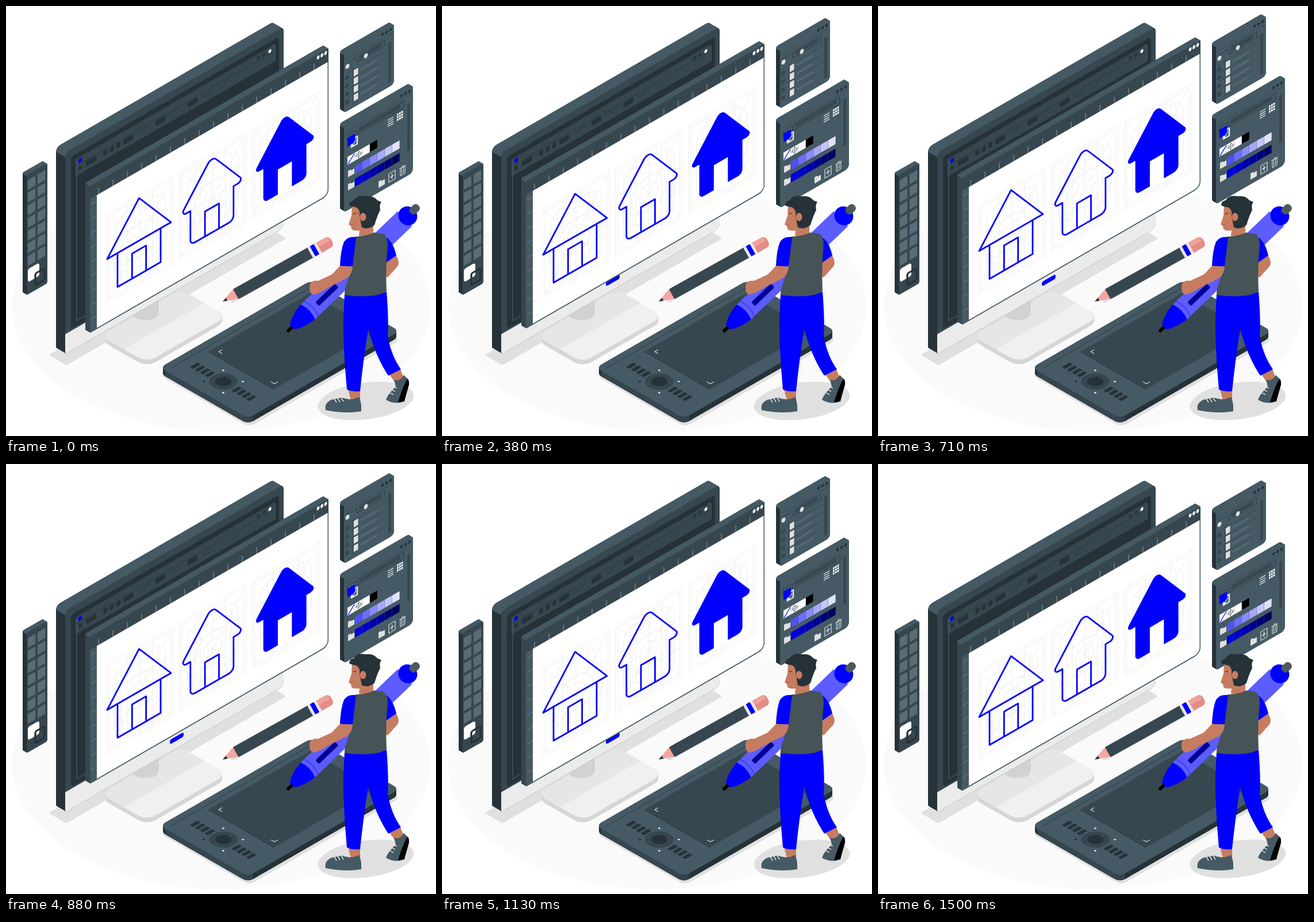
Write an HTML page with a canvas that moves like this. It is 748 px wide and 748 px high and loops after 1540 ms.

```html
<!DOCTYPE html>
<html lang="en">
<head>
<meta charset="utf-8">
<title>Icon design studio</title>
<style>
html, body { margin: 0; width: 100%; height: 100%; overflow: hidden; background: #fff; }
canvas { display: block; width: 100vw; height: 100vh; }
</style>
</head>
<body>
<canvas id="stage" width="748" height="748"></canvas>
<script>
const ctx = document.getElementById('stage').getContext('2d');
const SLOPE = 0.577;
const INK = '#263238', DARK = '#37474f', SLATE = '#455a64';
const BLUE = '#0000ff', SHADE = '#e0e0e0', SKIN = '#c67c60';

function fill(d, color) {
  ctx.fillStyle = color;
  ctx.fill(new Path2D(d));
}
function line(d, color, width = 1) {
  ctx.strokeStyle = color;
  ctx.lineWidth = width;
  ctx.stroke(new Path2D(d));
}
function box(x, y, w, h, color, r = 0) {
  ctx.fillStyle = color;
  ctx.beginPath();
  ctx.roundRect(x, y, w, h, r);
  ctx.fill();
}
function frame(x, y, w, h, color, width = 1, r = 0) {
  ctx.strokeStyle = color;
  ctx.lineWidth = width;
  ctx.beginPath();
  ctx.roundRect(x, y, w, h, r);
  ctx.stroke();
}
function oval(x, y, rx, ry, color, turn = 0) {
  ctx.fillStyle = color;
  ctx.beginPath();
  ctx.ellipse(x, y, rx, ry, turn, 0, 7);
  ctx.fill();
}
function ring(x, y, r, color, width) {
  ctx.strokeStyle = color;
  ctx.lineWidth = width;
  ctx.beginPath();
  ctx.arc(x, y, r, 0, 7);
  ctx.stroke();
}
function repeat(count, draw) {
  for (let i = 0; i < count; i++) draw(i);
}
function within(matrix, draw) {
  ctx.save();
  ctx.transform(...matrix);
  draw();
  ctx.restore();
}
// Upright isometric face with its top left at (x, y).
const onFace = (x, y, draw) => within([1, -SLOPE, 0, 1, x, y], draw);
// Ground plane with its left corner at (x, y); u runs up right, v down right.
const onGround = (x, y, draw) => within([1, -SLOPE, 1, SLOPE, x, y], draw);
// Straight tool with its tip at (x, y), pointing along (dx, dy).
function along(x, y, dx, dy, draw) {
  const a = Math.atan2(dy, dx), c = Math.cos(a), s = Math.sin(a);
  within([c, s, -s, c, x, y], draw);
}

function slab(x, y, w, h, depth, radii, front, side, top) {
  const back = (d, draw) => onFace(x - d, y - d * SLOPE, draw);
  const lift = depth * SLOPE, capHeight = Math.max(lift, radii[1] * 2);
  for (let d = depth; d > 0; d -= 0.5) back(d, () => box(0, 0, w, h, side, radii));
  for (let d = depth; d > 0; d -= 0.5)
    back(d, () => box(0, 0, w, capHeight, top, [radii[0], radii[1], 0, 0]));
  fill(`M${x - depth} ${y - lift + radii[0]}V${y + 30}H${x}V${y + radii[0]}Z`, side);
  onFace(x, y, () => box(0, 0, w, h, front, radii));
}
function plate(x, y, u, v, thickness, r, top, side) {
  for (let d = thickness; d > 0; d -= 0.5) onGround(x, y + d, () => box(0, 0, u, v, side, r));
  onGround(x, y, () => box(0, 0, u, v, top, r));
}

function floor() {
  ctx.fillStyle = '#fff';
  ctx.fillRect(0, 0, 748, 748);
  oval(374, 522, 364, 218, '#fafafa');
  onGround(74, 607, () => box(0, 0, 383, 31, SHADE, 3));
  onGround(268, 643, () => box(0, 0, 263, 155, SHADE, 9));
  oval(626, 687, 84, 32, SHADE, -0.13);
  along(378, 518, 154, -86, () => box(14, -6, 188, 13, SHADE, 4));
}

function stand() {
  plate(165, 574, 140, 80, 8, 15, '#f0f0f0', '#d6d6d6');
  onGround(165, 574, () => box(0, 0, 140, 40, '#e6e6e6', [15, 15, 0, 0]));
  fill('M221 538Q224 547 246 546 267 545 266 530V505Z', '#d2d2d2');
}

function monitor() {
  slab(103, 255, 380, 351, 16, [8, 7, 10, 4], DARK, INK, SLATE);
  onFace(103, 255, () => {
    box(0, 316, 380, 35, '#ebebeb', [0, 0, 10, 4]);
    line('M4 350.5H370', '#d5d5d5', 0.8);
    box(10, 13, 362, 300, INK, 6);
    box(18, 22, 347, 30, DARK, [4, 5, 0, 0]);
    line('M45 304H20V27M360 22Q365 22 365 28V50', SLATE, 1.2);
    line('M18 34H365', INK, 0.7);
    box(23, 25, 6, 7, BLUE, 1);
    box(23, 38, 6, 7, INK, 1);
    repeat(3, i => oval(336 + i * 10, 29, 2.6, 3, i < 2 ? INK : '#fff'));
    repeat(3, i => box(66 + i * 11.5, 36, 7, 9, INK, 2));
    box(36, 36, 18, 9, INK, 2);
    repeat(3, i => {
      box(101 + i * 56, 36, 17, 9, INK, 2);
      line(`M${124 + i * 56} 38h22m-18 5h12`, INK, 0.8);
    });
  });
  onFace(285, 480, () => box(0, 0, 24, 8, BLUE, 3.5));
}

function palette() {
  slab(36, 294, 36, 209, 7, [2, 3, 3, 2], DARK, INK, SLATE);
  onFace(36, 294, () => {
    repeat(14, i => box(2 + i % 2 * 17, 10 + Math.floor(i / 2) * 22, 13, 17, '#5a6c75', 1));
    box(2, 165, 20, 23, '#fff', 4);
    frame(15, 180, 16, 20, INK, 3.4, 2);
  });
}

function guides() {
  const tone = '#e9e9e9', w = 0.65;
  frame(0, 0, 116, 154, tone, w);
  frame(4, 5, 108, 144, tone, w);
  frame(14, 18, 88, 118, tone, w, 18);
  frame(26, 10, 64, 134, tone, w, 14);
  for (const r of [16, 30, 48]) ring(58, 77, r, tone, w);
  repeat(3, i => line(`M${36 + i * 22} 5V149M4 ${50 + i * 27}H112`, tone, w));
  line('M4 5L112 149M112 5L4 149', tone, w);
}

const HOUSE = { mid: 56.5, peak: 4.5, eave: 78.5, base: 137.5, roof: 55.5, wall: 37.5, door: 12.2, lintel: 94 };

function traceHouse(r) {
  const { mid, peak, eave, base, roof, wall } = HOUSE;
  const half = [[wall, base, 1.5 * r], [wall, eave, 0], [roof, eave, r]];
  const mirrored = half.map(([x, y, round]) => [-x, y, round]).reverse();
  const corners = [...half, [0, peak, 1.6 * r], ...mirrored];
  ctx.beginPath();
  ctx.moveTo(mid, base);
  corners.forEach(([x, y, round], i) => {
    const next = corners[i + 1] || [0, base];
    ctx.arcTo(mid + x, y, mid + next[0], next[1], round);
  });
  ctx.closePath();
}
function traceDoor() {
  const { mid, base, door, lintel } = HOUSE;
  ctx.moveTo(mid - door, base);
  ctx.lineTo(mid - door, lintel);
  ctx.lineTo(mid + door, lintel);
  ctx.lineTo(mid + door, base);
}
// Outlines are traced on the face but stroked flat, so the pen width stays even.
function house(x, y, r, solid) {
  const { mid, eave, wall, door, lintel, base } = HOUSE;
  onFace(x, y, () => {
    traceHouse(r);
    if (solid) {
      ctx.fillStyle = BLUE;
      ctx.fill();
      box(mid - door, lintel, door * 2, base - lintel + 1, '#fff');
      return;
    }
    traceDoor();
    if (r === 0) {
      ctx.moveTo(mid - wall, eave);
      ctx.lineTo(mid + wall, eave);
    }
  });
  if (solid) return;
  ctx.strokeStyle = BLUE;
  ctx.lineWidth = 2.8;
  ctx.lineJoin = 'round';
  ctx.stroke();
}

function designWindow() {
  slab(146, 312, 415, 257, 8, [2, 3, 10, 2], SLATE, DARK, SLATE);
  onFace(146, 312, () => {
    box(0, 1, 415, 23, DARK, [2, 3, 0, 0]);
    box(12, 24, 401.5, 231, '#fff', [0, 0, 9, 0]);
    repeat(3, i => oval(397 + i * 6.5, 6.5, 2.4, 3.2, '#fff'));
    repeat(16, i => line(`M${15 + i * 25} 13V24`, '#8a989f', 1.1));
    repeat(9, i => line(`M2 ${34 + i * 25}H12`, '#84939a', 0.8));
  });
  repeat(3, i => {
    const x = 175 + i * 126.8, y = 362.3 - i * 126.8 * SLOPE;
    onFace(x, y, guides);
    house(x, y, i ? 5.3 : 0, i === 2);
  });
}

function panelHeader(w, barHeight) {
  repeat(3, i => oval(w - 20 + i * 7, 6, 2.3, 2.8, INK));
  line(`M2 13H${w - 2}`, DARK, 0.9);
  line(`M5 30V20H22V29H${w - 16}V18H24`, INK, 0.8);
  box(26, 20, w - 48, 6, DARK, 1);
  box(w - 10, 26, 5, barHeight, DARK, 1);
}

function layersPanel() {
  slab(588, 82, 87, 104, 7, [4, 3, 6, 4], SLATE, INK, SLATE);
  onFace(588, 82, () => {
    panelHeader(87, 70);
    repeat(2, i => oval(6 + i * 32, 26.5, 3.4, 4, SHADE));
    line('M15 34V98', DARK, 0.8);
    repeat(4, i => {
      const y = 38 + i * 14.3;
      line(`M2 ${y}H75`, DARK, 0.9);
      box(2, y + 4, 7, 7, DARK, 2);
      box(17, y + 1.5, 7.5, 11, SHADE);
      line(`M29 ${y + 7}H58`, '#718087', 1.2);
    });
  });
}

function swatchPanel() {
  const folder = (x, y) => fill(`M${x} ${y}h4l2 2h5v9h-11z`, SHADE);
  slab(588, 208, 120, 151, 7, [4, 3, 7, 4], SLATE, INK, SLATE);
  onFace(588, 208, () => {
    panelHeader(120, 82);
    repeat(4, i => line(`M76 ${35 + i * 3.6}h10`, '#fff', 1.2));
    repeat(9, i => box(92 + i % 3 * 3.8, 33 + Math.floor(i / 3) * 4.6, 2.8, 3.3, '#fff'));

    frame(13, 32, 10, 13, SHADE, 2.5);
    box(6, 25, 13, 15, BLUE);
    line('M14 44L21 36M14 40V44H17', '#fff', 1.2);

    repeat(4, i => box(6 + i * 13, 58, 12.7, 14, i < 3 ? '#fff' : '#000'));
    line('M7 71L18 59', BLUE, 1.6);
    ring(25.5, 65, 4, DARK, 0.7);
    line('M19 65H32M25.5 58V72', DARK, 0.6);
    repeat(6, i => {
      box(19 + i * 13, 81.5, 12.6, 14, `hsl(240 90% ${64 + i * 6}%)`);
      box(19 + i * 13, 103.5, 12.6, 14, `hsl(240 100% ${44 - i * 5}%)`);
    });

    folder(7, 83);
    folder(7, 106);
    folder(60, 132);
    frame(78, 129, 11, 15, SHADE, 1.2);
    line('M83.5 132V141M80 136.5H87', '#fff', 1.1);
    frame(98, 132, 8, 12, SHADE, 1.1, 1);
    line('M96 131H108M100 129H104M100.5 134V142M103.5 134V142', SHADE);
  });
}

function pencil() {
  along(377, 514, 154, -86, () => {
    fill('M0 0L26 -10Q32 0 28 10Z', '#f4a6a0');
    fill('M0 0L8 -3V3Z', INK);
    box(26, -10, 150, 20, DARK, 2);
    box(174, -10, 19, 20, '#e6e6e6', 2);
    box(179, -10, 8, 20, BLUE, 1);
    box(192, -10, 25, 20, '#e58b86', [0, 7, 7, 0]);
    box(192, -10, 22, 9, '#efa19a', [0, 6, 0, 0]);
  });
}

function tablet() {
  plate(268, 629, 263, 153, 10, 9, SLATE, INK);
  for (let d = 10; d > 0; d -= 0.5) onGround(268, 629 + d, () => line('M.5 9V144Q.5 152 9 152.5', DARK, 1));
  onGround(268, 629, () => {
    box(0, 0, 263, 153, SLATE, 9);
    box(66, 18, 177, 114, DARK);
    line('M9 10H250M66 18V132', INK, 0.6);
    line('M75 33V27H81M75 118V124H81', '#fff', 0.9);
    repeat(8, i => box(27, 25 + i * 8.5 + (i > 3 ? 38 : 0), 13, 5.5, INK, 1));
    oval(34, 76, 17.5, 17.5, DARK);
    oval(34, 76, 10, 10, INK);
    repeat(4, i => {
      const a = Math.PI * (i / 2 + 0.25);
      oval(34 + 24 * Math.cos(a), 76 + 24 * Math.sin(a), 1.4, 1.4, i === 2 ? BLUE : '#fff');
    });
  });
}

function stylus() {
  along(492, 564, 208, -200, () => {
    box(-4, -3, 16, 6, '#000', 2);
    box(46, -18, 234, 36, '#5c5cff');
    fill('M8 -6Q24 -16 46 -18 53 0 46 18 24 16 8 6Z', BLUE);
    line('M54 -18Q61 0 54 18', '#3434ee', 1.4);
    oval(287, 0, 16, 17, BLUE);
    box(294, -7, 19, 14, '#4e595d', 6);
    box(67, -3, 47, 9, '#000099', 2);
  });
}

function shoes() {
  fill('M595 667H616V686H600Z', SKIN);
  fill('M667 641L686 632 692 647 676 654Z', SKIN);
  fill('M556 703Q553 691 566 685L584 681Q600 688 614 680 619 690 618 705 590 710 556 703Z', SLATE);
  fill('M675 650Q685 654 692 642L701 651 693 688Q675 694 661 685 664 675 678 662Z', SLATE);
  fill('M698 648Q702 653 701 659L693 687 682 690Q687 670 698 648Z', '#000');
  repeat(3, i => {
    line(`M${571 + i * 6} ${683 - i}l4 7`, '#fff', 1.3);
    line(`M${668 + i * 3} ${673 - i * 5.5}l6 3`, '#fff', 1.2);
  });
}

function head() {
  fill('M616 380H639V400H614Z', SKIN);
  fill('M602 344L601 365 596 380 600 383 601 388Q604 392 618 390L636 378V344Z', SKIN);
  fill('M597 347Q597 339 605 338 610 328 626 331 639 329 646 338L653 341Q649 346 651 355 646 364 641 381 630 390 619 385L615 365Q617 355 609 350 603 350 597 347Z', INK);
  oval(621, 367, 5.5, 7, SKIN);
  line('M604 361h5', INK, 1.2);
  line('M600 380h4', '#9e5b45');
}

function person() {
  shoes();
  fill('M625 505L662 497Q666 545 664 575 671 610 687 632L665 643Q643 610 630 562Z', BLUE);
  fill('M589 500H646Q640 540 630 562 621 620 616 670 604 672 593 667 586 590 587 540Z', BLUE);
  line('M657 508Q654 530 633 541', '#0000c0', 0.8);

  fill('M662 444L678 433Q686 445 681 453L664 472 659 470Z', SKIN);
  fill('M660 402Q673 408 679 434L662 446Z', BLUE);
  head();
  fill('M608 401Q625 401 641 394L656 396Q664 400 664 417 660 455 662 496 645 509 589 503 588 494 596 474 604 445 604 425Z', '#465357');
  fill('M609 402Q595 400 588 410 582 425 581 452 592 455 603 452Z', BLUE);
  fill('M581 452L603 453Q602 468 592 474L560 490Q546 500 535 502 525 499 529 483 533 477 543 478L567 467Z', SKIN);
}

// Pictures change on 24 fps ticks rounded to 10 ms; the float goes up and down linearly over 36 ticks.
function liftAt(ms) {
  const tickStart = i => Math.round(i * 100 / 24) * 10;
  let tick = 36;
  while (tick > 0 && tickStart(tick) > ms) tick--;
  return -15 * (1 - Math.abs(tick - 18) / 18);
}

function render(ms) {
  floor();
  palette();
  stand();
  monitor();
  within([1, 0, 0, 1, 0, liftAt(ms % 1540)], () => {
    designWindow();
    layersPanel();
    swatchPanel();
  });
  pencil();
  tablet();
  stylus();
  person();
}

const start = performance.now();
function loop() {
  render(performance.now() - start);
  requestAnimationFrame(loop);
}
loop();
</script>
</body>
</html>
```
